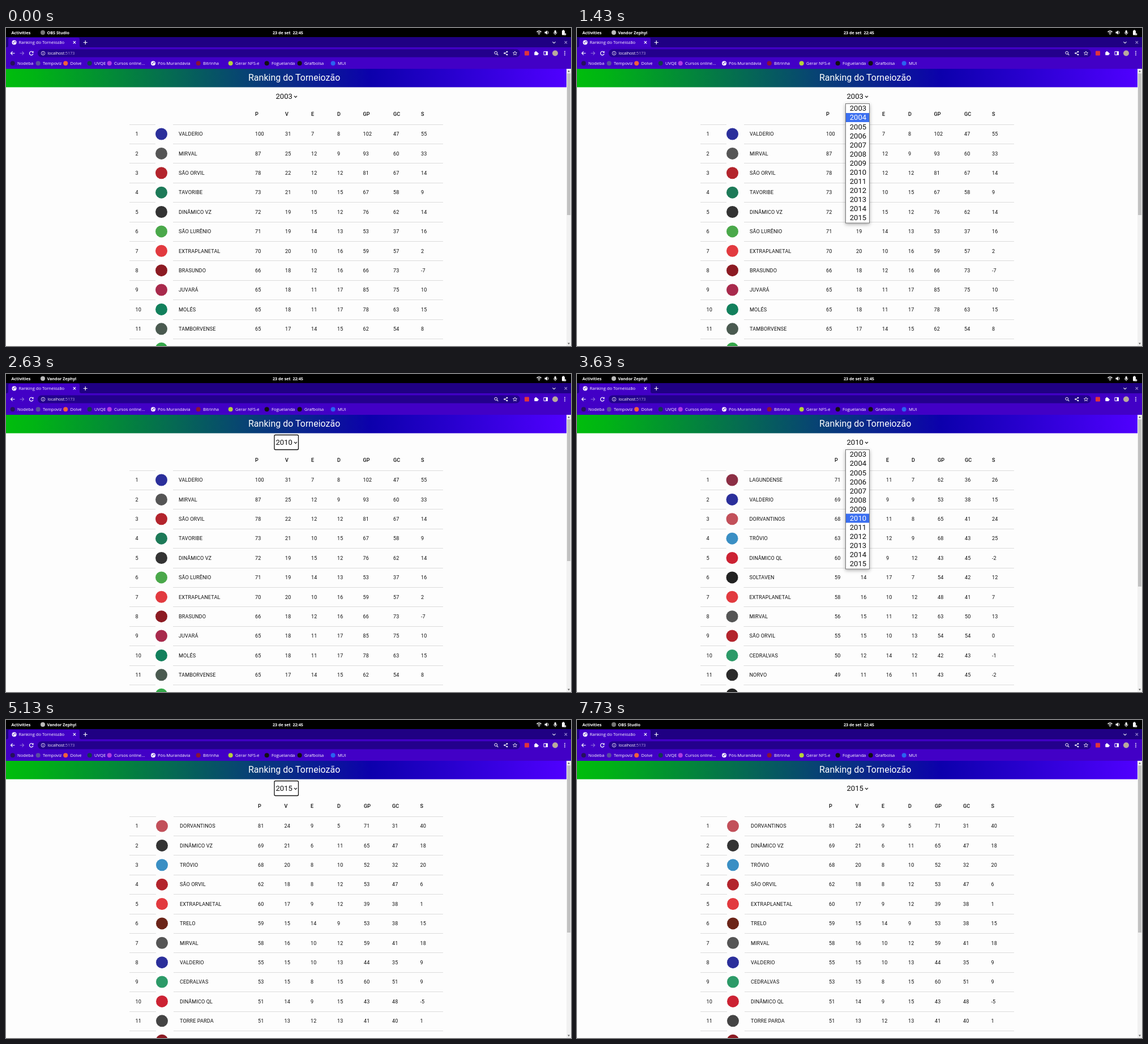
Write an HTML page that moves like this. It is 998 by 561 pixels and loops after 7860 ms.

```html
<!DOCTYPE html>
<html lang="pt-BR">
<head>
<meta charset="utf-8">
<title>Ranking</title>
<style>
  html, body { margin: 0; width: 100%; height: 100%; overflow: hidden; background: #fdfdfd; }
  svg { display: block; width: 998px; height: 561px; }
  text { white-space: pre; }
  .ui { font-family: "Open Sans", "Noto Sans", sans-serif; }
  .page { font-family: Roboto, Arial, sans-serif; }
  #menu { filter: drop-shadow(0 2px 3px #0005); }
</style>
</head>
<body>
<svg id="stage" viewBox="0 0 998 561" xmlns="http://www.w3.org/2000/svg"></svg>
<script>
const LOOP = 7860;
const ROW = 34.38;
const ITEM = 16.08;
const TITLE = 'Ranking do Torneiozão';

// Each row: team, wins, draws, goals for, goals against.
const seasons = {
  2003: {
    cols: [440, 493, 539, 585, 630.5, 684, 733], name: 305, crest: 274.5, thumb: 330, last: '#35a84a',
    rows: `VALDERIO 31 7 102 47|MIRVAL 25 12 93 60|SÃO ORVIL 22 12 81 67|TAVORIBE 21 10 67 58
      |DINÂMICO VZ 19 15 76 62|SÃO LURÊNIO 19 14 53 37|EXTRAPLANETAL 20 10 59 57|BRASUNDO 18 12 66 73
      |JUVARÁ 18 11 85 75|MOLÉS 18 11 78 63|TAMBORVENSE 17 14 62 54`
  },
  2010: {
    cols: [455, 501, 546, 591, 637, 685, 733], name: 304.5, crest: 274, thumb: 375, last: '#222',
    rows: `LAGUNDENSE 20 11 62 36|VALDERIO 20 9 53 38|DORVANTINOS 19 11 65 41|TRÓVIO 17 12 68 43
      |DINÂMICO QL 17 9 43 45|SOLTAVEN 14 17 54 42|EXTRAPLANETAL 16 10 48 41|MIRVAL 15 11 63 50
      |SÃO ORVIL 15 10 54 54|CEDRALVAS 12 14 42 43|NORVO 11 16 43 45`
  },
  2015: {
    cols: [445, 491.5, 538, 585, 632, 682, 731.5], name: 307, crest: 275.5, thumb: 375, last: '#8c1a22',
    rows: `DORVANTINOS 24 9 71 31|DINÂMICO VZ 21 6 65 47|TRÓVIO 20 8 52 32|SÃO ORVIL 18 8 53 47
      |EXTRAPLANETAL 17 9 39 38|TRELO 15 14 53 38|MIRVAL 16 10 59 41|VALDERIO 15 10 44 35
      |CEDRALVAS 15 8 60 51|DINÂMICO QL 14 9 43 48|TORRE PARDA 13 12 41 40`
  }
};

const crestColors = {
  VALDERIO: '#2b2f9b', MIRVAL: '#555', 'SÃO ORVIL': '#b3242c', TAVORIBE: '#1d7a58',
  'DINÂMICO VZ': '#333', 'SÃO LURÊNIO': '#4aa84a', EXTRAPLANETAL: '#e23a3f', BRASUNDO: '#8c1a22',
  JUVARÁ: '#a82a4c', MOLÉS: '#12805c', TAMBORVENSE: '#4a5a50', LAGUNDENSE: '#8c2f45',
  DORVANTINOS: '#c2505a', TRÓVIO: '#3a8fc4', 'DINÂMICO QL': '#cc2233', SOLTAVEN: '#222',
  CEDRALVAS: '#2c9a68', NORVO: '#2a2a2a', TRELO: '#6b2418', 'TORRE PARDA': '#444'
};

// The y passed to text() is the middle of the capitals.
const text = (x, y, s, size, fill = '#111', weight = 400, extra = '') =>
  `<text x="${x}" y="${y + size * 0.357}" font-size="${size}" fill="${fill}" font-weight="${weight}" ${extra}>${s}</text>`;
const rect = (x, y, w, h, fill, rx = 0, extra = '') =>
  `<rect x="${x}" y="${y}" width="${w}" height="${h}" fill="${fill}" rx="${rx}" ${extra}/>`;
const dot = (x, y, r, fill) => `<circle cx="${x}" cy="${y}" r="${r}" fill="${fill}"/>`;
const line = (d, color = '#fff', width = 1.1) =>
  `<path d="${d}" fill="none" stroke="${color}" stroke-width="${width}"/>`;
const shape = (d, fill = '#fff') => `<path d="${d}" fill="${fill}"/>`;
const globe = (x, y) => dot(x, y, 4, '#fff') +
  shape(`M${x - 3} ${y - 1}l2.5 1.2l0 2.4zM${x + 0.5} ${y - 3}l2.3 2l-2 1.2z`, '#4200c6');

function systemBar() {
  return rect(0, 0, 998, 16, '#000') +
    text(9.5, 8, 'Activities', 7.3, '#fff', 700) +
    `<g id="recorder">${dot(65, 8, 4, '#777') + text(72.5, 8, 'OBS Studio', 7.2, '#fff', 700)}</g>` +
    `<g id="browser">${dot(65, 8, 4, '#bbb') + text(72.5, 8, 'Vandor Zephyl', 7.2, '#fff', 700)}</g>` +
    text(471, 8, '23 de set  22:45', 7.2, '#fff', 700) +
    line('M937.5 7a5.5 5.5 0 0 1 8 0M939.3 9a3 3 0 0 1 4.4 0', '#fff', 1.3) + dot(941.5, 10.8, 1, '#fff') +
    shape('M951.5 6.5h2l2.5-2.3v7.6l-2.5-2.3h-2z') + line('M957.2 5.8q1.8 2.2 0 4.4', '#fff', 1) +
    rect(968.6, 4, 3.2, 5.5, '#fff', 1.6) + line('M967.3 7.5q0 3.3 2.9 3.3q2.9 0 2.9-3.3M970.2 11v1.5', '#fff', 0.8) +
    rect(982, 4.5, 5, 8, '#fff', 1) + rect(983.3, 3.5, 2.4, 1.5, '#fff') + dot(987.5, 11, 2, '#ccc');
}

function tabsAndToolbar() {
  return rect(0, 16, 998, 18, '#1f0083') + rect(0, 34, 998, 38, '#4200c6') +
    shape('M1 34q3 0 3-3V20q0-3 3-3H127q3 0 3 3v11q0 3 3 3z', '#4200c6') +
    globe(14.5, 25.5) + text(22.5, 25.3, TITLE, 7.6, '#fff') +
    line('M118.7 23.2l4.4 4.4m0-4.4l-4.4 4.4') + line('M136.7 25.5h7M140.2 22v7', '#fff', 1.2) +
    line('M965.5 24.3l2.5 2.5l2.5-2.5') + line('M986.6 23.2l4.4 4.4m0-4.4l-4.4 4.4', '#9f8bd6') +
    line('M15.5 44.5h-7m3-3l-3 3l3 3', '#fff', 1.2) + line('M24.5 44.5h7m-3-3l3 3l-3 3', '#8c6ad8', 1.2) +
    line('M47.6 42.8a3.3 3.3 0 1 0 .4 2.6', '#fff', 1.2) + shape('M48.6 40.6v3.2h-3.2z') +
    rect(56, 37.5, 852, 14, '#23008c', 7) +
    `<circle cx="65.5" cy="44.5" r="3.3" fill="none" stroke="#fff" stroke-width=".8"/>` +
    line('M65.5 44v2.2M65.5 42.4v.9', '#fff', 0.9) +
    text(73.5, 44.5, 'localhost<tspan fill="#b3a2e0">:5173</tspan>', 7.1, '#fff') +
    `<circle cx="865.3" cy="43.8" r="2.4" fill="none" stroke="#fff"/>` + line('M867 45.6l2.3 2.3') +
    line('M885 42l-4.5 2.5l4.5 2.5', '#fff', 0.9) + dot(885, 42, 1.3, '#fff') + dot(880.5, 44.5, 1.3, '#fff') + dot(885, 47, 1.3, '#fff') +
    line('M899 41l1 2.3l2.5.2l-1.9 1.7l.6 2.5l-2.2-1.3l-2.2 1.3l.6-2.5l-1.9-1.7l2.5-.2z', '#fff', 0.8) +
    rect(916, 40.5, 8, 8, '#e0343c', 1) +
    rect(933.3, 42.5, 6, 5.5, '#fff', 0.8) + dot(936, 42.3, 1.4, '#fff') + dot(939.4, 45.3, 1.4, '#fff') +
    line('M950 41.5h6.5v6h-6.5z', '#fff', 1) + rect(953.5, 41.5, 3, 6, '#fff') +
    dot(970, 44.5, 5, '#b9ab9c') +
    [41.5, 44.5, 47.5].map(y => dot(987, y, 0.9, '#fff')).join('');
}

function bookmarks() {
  const items = [
    [20, 'Nodeba', '#25105c'], [65, 'Tempoviz', '#5b4fa0'], [113.5, 'Dolve', '#f2603c'], [156, 'UVQE', '#123a50'],
    [191, 'Cursos online...', '#b13be0'], [268, 'Pós-Murandávia'], [348, 'Bitrinha', '#8a1238'],
    [405, 'Gerar NFS-e', '#b4d23c'], [469, 'Foguelanda', '#111'], [527, 'Grafbolsa', '#111'], [586, 'MUI', '#2a62f0']
  ];
  return items.map(([x, label, color]) =>
    (color ? dot(x - 8.3, 62.3, 4, color) : globe(x - 8, 62.3)) + text(x, 62.3, label, 7.6, '#fff')).join('');
}

function table(year) {
  const { cols, name, crest, thumb, last, rows } = seasons[year];
  const games = year === '2003' ? 46 : 38;
  const cell = (x, y, s, weight) => text(x, y, s, 9.1, '#111', weight, 'letter-spacing=".1"');
  let out = cols.map((x, i) => cell(x, 151.7, ['P', 'V', 'E', 'D', 'GP', 'GC', 'S'][i], 500)).join('');
  rows.split('|').forEach((row, i) => {
    const [, team, ...stats] = row.trim().match(/^(.+) (\d+) (\d+) (\d+) (\d+)$/);
    const [wins, draws, scored, conceded] = stats.map(Number);
    const y = 187 + i * ROW;
    const values = [3 * wins + draws, wins, draws, games - wins - draws, scored, conceded, scored - conceded];
    out += cell(228.5, y, i + 1) + dot(crest, y, 10.5, crestColors[team]) + cell(name, y, team) +
      values.map((v, k) => cell(cols[k], y, v)).join('');
  });
  out += dot(crest, 187 + 11 * ROW, 10.5, last);
  for (let i = 0; i < 12; i++) {
    const y = Math.round(169.7 + i * ROW);
    out += rect(218, y, crest - 228.5, 1, '#dcdcdc') + rect(crest + 20.5, y, 751.5 - crest, 1, '#dcdcdc');
  }
  return `<g id="table${year}">${out}${rect(991, 80, 6, thumb - 80, '#c1c1c1')}</g>`;
}

function yearMenu() {
  const labels = Array.from({ length: 13 }, (_, i) =>
    text(481.7, 141.7 + i * ITEM, 2003 + i, 13.1, '#111', 400, 'class="option"')).join('');
  return `<g id="menu">${rect(474.5, 133.5, 42, 210.5, '#fff', 0, 'stroke="#777"')}` +
    `${rect(475, 0, 41, 16, '#3b6ff0', 0, 'id="highlight"')}${labels}</g>`;
}

const stage = document.getElementById('stage');
stage.innerHTML = `
  <defs><linearGradient id="banner">
    <stop offset="0" stop-color="#00bd0c"/><stop offset=".05" stop-color="#00b414"/>
    <stop offset=".65" stop-color="#0c00ac"/><stop offset="1" stop-color="#5000ff"/>
  </linearGradient></defs>
  ${rect(0, 0, 998, 561, '#fdfdfd')}
  <g class="ui">${systemBar()}${tabsAndToolbar()}${bookmarks()}</g>
  <g class="page">
    ${rect(0, 72, 990, 32.5, 'url(#banner)')}
    ${text(428, 87.3, TITLE, 16, '#fff')}
    ${rect(990, 72, 8, 489, '#f1f1f1')}
    ${shape('M994 74.5l2 3h-4z', '#666')}${shape('M994 558.5l2-3h-4z', '#666')}
    ${Object.keys(seasons).map(table).join('')}
    ${rect(474, 107.5, 42.5, 26, '#fff', 2, 'id="focus" stroke="#101010" stroke-width="1.3"')}
    ${text(476.5, 120.3, '2003', 13.1, '#111', 400, 'id="year"')}
    ${line('M509 119.8l2.5 2.5l2.5-2.5', '#111', 1.2)}
    ${yearMenu()}
  </g>`;

const byId = id => document.getElementById(id);
const show = (id, on) => byId(id).setAttribute('visibility', on ? 'visible' : 'hidden');
const options = [...document.querySelectorAll('.option')];

// Each visit to the menu: opening, closing, first year, and when the pointer enters each next year.
const visits = [
  { open: 1100, close: 2530, from: 2003, moves: [1370, 1640, 1800, 1950, 2080, 2200, 2330] },
  { open: 3500, close: 4970, from: 2010, moves: [3970, 4100, 4270, 4430, 4600] }
];

function render(t) {
  const visit = visits.find(v => t >= v.open && t < v.close);
  const active = t >= 1100 && t < 7570;
  const tableYear = t < 2700 ? 2003 : t < 5070 ? 2010 : 2015;
  show('recorder', !active);
  show('browser', active);
  show('focus', active && !visit);
  show('menu', !!visit);
  Object.keys(seasons).forEach(y => show('table' + y, +y === tableYear));
  byId('year').textContent = t < 2530 ? 2003 : t < 4970 ? 2010 : 2015;
  if (visit) {
    const index = visit.from - 2003 + visit.moves.filter(m => t >= m).length;
    byId('highlight').setAttribute('y', 133.9 + index * ITEM);
    options.forEach((o, i) => o.setAttribute('fill', i === index ? '#fff' : '#111'));
  }
}

function tick() {
  render(performance.now() % LOOP);
  requestAnimationFrame(tick);
}
tick();
</script>
</body>
</html>
```
